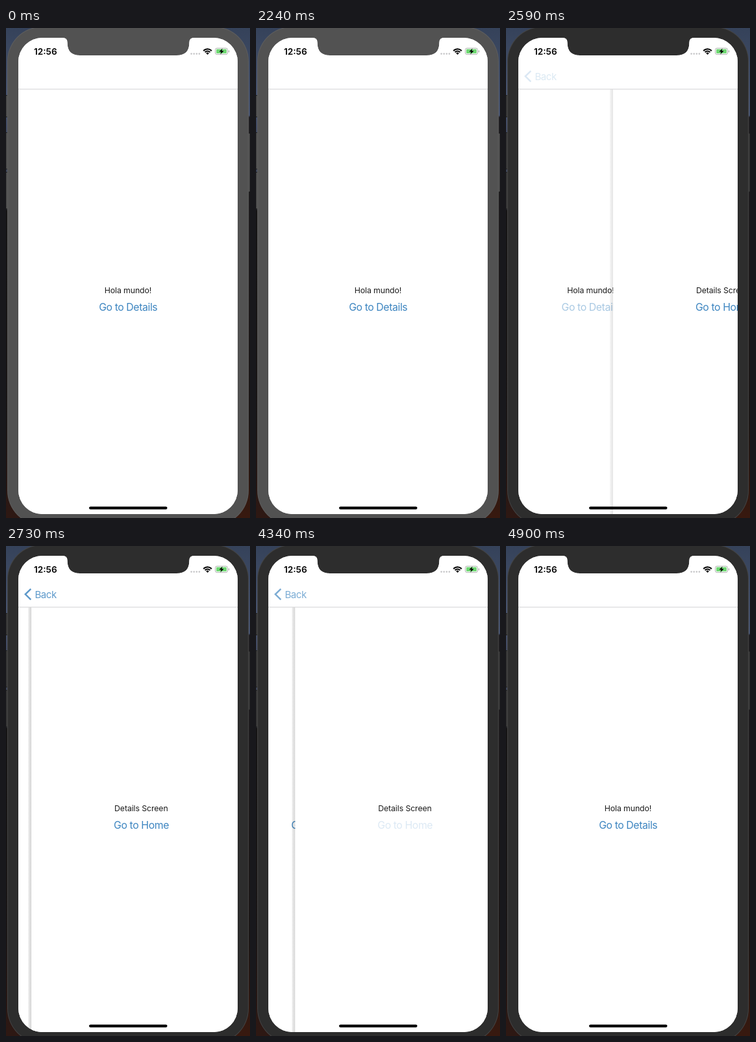
Recreate the animation shown at these times as an HTML page with a canvas. Size 376x752 px, loop 5880 ms.

```html
<!DOCTYPE html>
<html lang="en">
<head>
<meta charset="utf-8">
<title>Stack navigation</title>
<style>
html, body { margin: 0; width: 100%; height: 100%; overflow: hidden; background: #15110f; }
canvas { display: block; width: 376px; height: 752px; }
</style>
</head>
<body>
<canvas id="stage" width="376" height="752"></canvas>
<script>
const ctx = document.getElementById('stage').getContext('2d');
const LOOP = 5880, STEP = 70;
const LEFT = 19, RIGHT = 357, TOP = 15, BOTTOM = 746;
const WIDTH = RIGHT - LEFT, HEADER = 94;
const BLUE = '#3d85c0', INK = '#1c1c1c';
const PRESSED = 0.18;

const clamp = v => Math.min(1, Math.max(0, v));
const mix = (a, b, k) => a + (b - a) * k;
const ramp = (t, start, length) => clamp((t - start) / length);

// Cubic bezier easing (0.2833, 0.99, 0.31833, 0.99)
const curve = (s, a, b) => 3 * (1 - s) * (1 - s) * s * a + 3 * (1 - s) * s * s * b + s * s * s;
function ease(x) {
  if (x <= 0 || x >= 1) return clamp(x);
  let lo = 0, hi = 1;
  for (let i = 0; i < 24; i++) {
    const mid = (lo + hi) / 2;
    if (curve(mid, 0.2833, 0.31833) < x) lo = mid; else hi = mid;
  }
  return curve(lo, 0.99, 0.99);
}

// Opacity of a button that is pressed and later let go
function buttonAlpha(t, press, pressTime, release) {
  const down = mix(1, PRESSED, ramp(t, press, pressTime));
  return mix(down, 1, ramp(t, release, 250));
}

function rect(x, y, w, h, color) {
  ctx.fillStyle = color;
  ctx.fillRect(x, y, w, h);
}

function rounded(x, y, w, h, r, color) {
  ctx.fillStyle = color;
  ctx.beginPath();
  ctx.roundRect(x, y, w, h, r);
  ctx.fill();
}

function text(str, x, y, size, color, { align = 'center', weight = 400, spacing = 0, alpha = 1 } = {}) {
  ctx.save();
  ctx.globalAlpha = alpha;
  ctx.font = `${weight} ${size}px Inter, sans-serif`;
  ctx.letterSpacing = spacing + 'px';
  ctx.textAlign = align;
  ctx.fillStyle = color;
  ctx.fillText(str, x, y);
  ctx.restore();
}

function vertical(x, w, stops) {
  const g = ctx.createLinearGradient(0, 0, 0, 752);
  stops.forEach(([y, color]) => g.addColorStop(y / 752, color));
  rect(x, 0, w, 752, g);
}

function desktop() {
  vertical(0, 188, [[0, '#35425a'], [100, '#47536e'], [160, '#414a61'], [276, '#3a3f4c'],
    [280, '#161515'], [600, '#1b1717'], [752, '#2e1813']]);
  vertical(188, 188, [[0, '#35425a'], [134, '#48546f'], [137, '#201f22'],
    [600, '#1c1716'], [752, '#38190f']]);
}

function device(active) {
  const key = active ? '#363636' : '#494949';
  const keys = [[0, 104, 32], [0, 161, 55], [0, 222, 55], [372, 162, 89]];
  for (const [x, y, h] of keys) {
    rect(x, y - 1, 4, h + 2, '#202020');
    rect(x, y, 4, h, key);
  }
  rounded(2, -2, 372, 765, 53, active ? '#444444' : '#5e5e5e');
  rounded(3, -1, 370, 763, 52, active ? '#2d2d2d' : '#525252');
}

function screenPath() {
  const r = 37;
  ctx.beginPath();
  ctx.moveTo(LEFT + r, TOP);
  ctx.lineTo(87, TOP);
  ctx.quadraticCurveTo(94.5, TOP, 94.5, 22);
  ctx.bezierCurveTo(94.5, 36, 101, 42, 114, 42);
  ctx.lineTo(263, 42);
  ctx.bezierCurveTo(276, 42, 282.5, 36, 282.5, 22);
  ctx.quadraticCurveTo(282.5, TOP, 290, TOP);
  ctx.arcTo(RIGHT, TOP, RIGHT, BOTTOM, r);
  ctx.arcTo(RIGHT, BOTTOM, LEFT, BOTTOM, r);
  ctx.arcTo(LEFT, BOTTOM, LEFT, TOP, r);
  ctx.arcTo(LEFT, TOP, RIGHT, TOP, r);
  ctx.closePath();
}

function wifi(x, y) {
  ctx.strokeStyle = '#000';
  ctx.lineWidth = 2;
  for (const r of [5.4, 8.7]) {
    ctx.beginPath();
    ctx.arc(x, y, r, -Math.PI * 0.76, -Math.PI * 0.24);
    ctx.stroke();
  }
  ctx.fillStyle = '#000';
  ctx.beginPath();
  ctx.moveTo(x, y);
  ctx.arc(x, y, 3.2, -Math.PI * 0.76, -Math.PI * 0.24);
  ctx.fill();
}

function battery() {
  ctx.strokeStyle = '#a5aaa5';
  ctx.lineWidth = 0.9;
  ctx.beginPath();
  ctx.roundRect(322.5, 31, 19, 9.6, 2.6);
  ctx.stroke();
  rounded(324, 32.5, 16, 6.6, 1.4, '#6fd873');
  rounded(342.9, 34.2, 1.2, 3.2, 0.6, '#a5aaa5');
  ctx.beginPath();
  [[333.6, 31.2], [328.4, 36.5], [331.5, 36.5], [330.4, 40.6], [335.7, 35], [332.5, 35]]
    .forEach(([x, y]) => ctx.lineTo(x, y));
  ctx.closePath();
  ctx.fillStyle = '#000';
  ctx.fill();
}

function statusBar() {
  text('12:56', 43, 40.6, 13.6, '#000', { align: 'left', weight: 600 });
  for (let i = 0; i < 4; i++) rounded(284.3 + i * 4.1, 38.3, 2.6, 2.6, 1.3, '#c6c6c8');
  wifi(310.6, 41);
  battery();
}

function header(open) {
  rect(LEFT, TOP, WIDTH, HEADER - TOP, '#fff');
  rect(LEFT, 93.4, WIDTH, 1, '#d3d3d5');
  if (open <= 0) return;
  const alpha = open ** 3;
  ctx.save();
  ctx.globalAlpha = alpha;
  ctx.strokeStyle = BLUE;
  ctx.lineWidth = 2.5;
  ctx.beginPath();
  ctx.moveTo(38.3, 65.8);
  ctx.lineTo(29.8, 74.1);
  ctx.lineTo(38.3, 82.4);
  ctx.stroke();
  ctx.restore();
  text('Back', 44.4, 79.5, 15, BLUE, { align: 'left', spacing: -0.4, alpha });
}

function card(x, label, action, alpha) {
  rect(x, HEADER, WIDTH, BOTTOM - HEADER, '#fff');
  const mid = x + WIDTH / 2;
  text(label, mid, 407.3, 12.3, INK, { spacing: -0.1 });
  text(action, mid + 0.2, 433.7, 15.8, BLUE, { spacing: -0.4, alpha });
}

function edgeShadow(x, strength) {
  const g = ctx.createLinearGradient(x - 6, 0, x, 0);
  g.addColorStop(0, 'rgba(0,0,0,0)');
  g.addColorStop(0.4, `rgba(0,0,0,${0.11 * strength})`);
  g.addColorStop(1, `rgba(0,0,0,${0.18 * strength})`);
  rect(x - 6, HEADER, 6, BOTTOM - HEADER, g);
}

function draw(t) {
  const open = ease(ramp(t, 2501, 500)) - ease(ramp(t, 4325.5, 410));

  desktop();
  device(t >= 2310);

  ctx.save();
  screenPath();
  ctx.fillStyle = '#fff';
  ctx.fill();
  ctx.clip();
  card(LEFT - 0.3 * WIDTH * open, 'Hola mundo!', 'Go to Details', buttonAlpha(t, 2250, 130, 2510));
  if (open > 0) {
    const x = LEFT + WIDTH * (1 - open);
    if (open < 1) edgeShadow(x, open);
    card(x, 'Details Screen', 'Go to Home', buttonAlpha(t, 4185, 150, 4340));
  }
  header(open);
  statusBar();
  rounded(128, 734.4, 120.5, 4.4, 2.2, '#000');
  ctx.restore();
}

const begin = performance.now();
function tick() {
  const t = (performance.now() - begin) % LOOP;
  draw(Math.floor(t / STEP) * STEP);
  requestAnimationFrame(tick);
}
tick();
</script>
</body>
</html>
```
